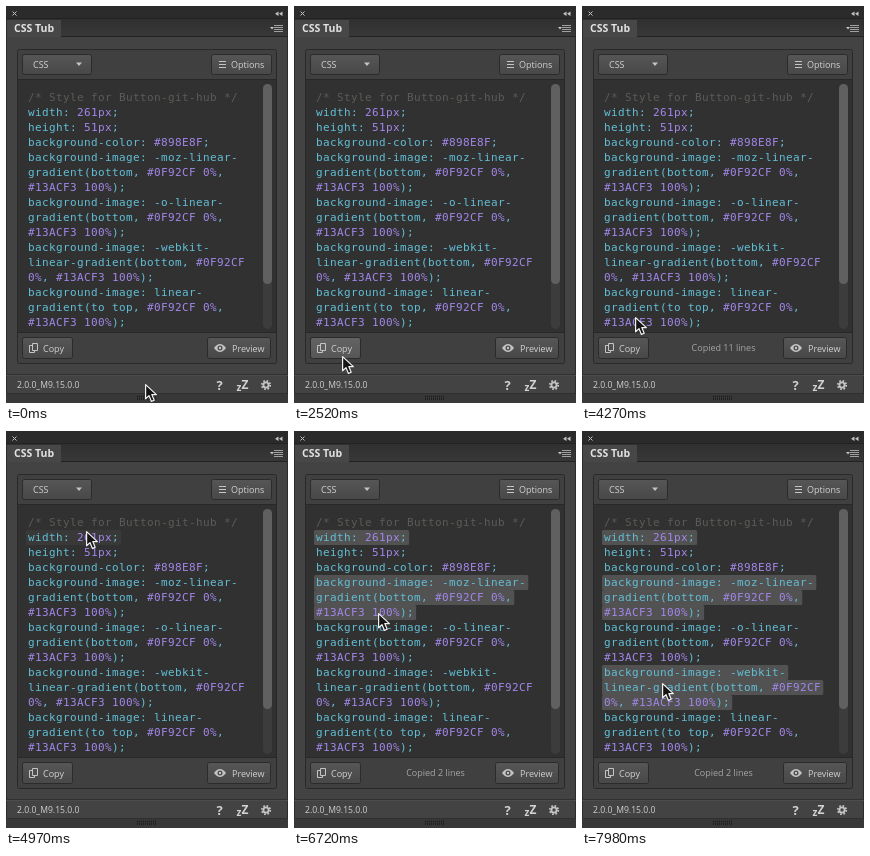
Recreate the animation shown at these times as an HTML page. Size 282 by 397 pixels, loop 8000 ms.

```html
<!DOCTYPE html>
<html lang="en">
<head>
<meta charset="utf-8">
<title>CSS panel</title>
<style>
  html, body { margin: 0; width: 100%; height: 100%; overflow: hidden; background: #434343; }
  svg { display: block; width: 282px; height: 397px; }
  text { white-space: pre; }
  .ui { font: 9px "Open Sans", sans-serif; fill: #d2d2d2; }
  .bold { font-weight: bold; }
  .code { font: 11px "DejaVu Sans Mono", monospace; letter-spacing: .38px; fill: #62bfd6; }
  .code .value { fill: #a287ea; }
  .code.comment { fill: #5b5b57; }
  .button { fill: url(#raised); stroke: #2b2b2b; }
  .icon { fill: none; stroke: #c4c4c4; }
  .solid { fill: #c4c4c4; }
</style>
</head>
<body>
<svg viewBox="0 0 282 397">
  <defs>
    <linearGradient id="raised" x2="0" y2="1">
      <stop stop-color="#565656"/><stop offset="1" stop-color="#484848"/>
    </linearGradient>
    <linearGradient id="tabs" x2="0" y2="1">
      <stop stop-color="#303030"/><stop offset="1" stop-color="#383838"/>
    </linearGradient>
  </defs>

  <!-- window -->
  <rect width="282" height="397" fill="#434343"/>
  <rect width="282" height="13" fill="#2b2b2b"/>
  <rect y="13" width="282" height="18" fill="url(#tabs)"/>
  <path d="M0 12.5H282M0 30.5H282" stroke="#222"/>
  <path d="M1 31V14H55V31Z" fill="#474747"/>
  <path class="icon" d="M6.500 5.500l4 4m0-4l-4 4"/>
  <path class="solid" d="M272.500 5.500v4.500l-3.500-2.250zM276.500 5.500v4.500l-3.500-2.250z"/>
  <path class="solid" d="M264 21h4l-2 2.500z"/>
  <path d="M268 19.500h9m-9 2h9m-9 2h9m-9 2h9" stroke="#a0a0a0"/>
  <text class="bold" x="8" y="26" style="font-family:'Open Sans',sans-serif;font-size:10.500px" fill="#e2e2e2">CSS Tub</text>
  <path d="M.5 13V397M281.500 13V397" stroke="#2c2c2c"/>

  <!-- code panel -->
  <rect x="11.500" y="43.500" width="259" height="314" rx="2" fill="#404040" stroke="#292929"/>
  <rect x="12" y="73" width="258" height="254" fill="#313131"/>
  <path d="M12 73.500H270M12 326.500H270" stroke="#282828"/>
  <rect x="257" y="78" width="9" height="245" rx="4.500" fill="#3c3c3c"/>
  <rect x="257" y="78" width="9" height="200" rx="4.500" fill="#606060"/>

  <g class="ui">
    <rect class="button" x="16.500" y="48.500" width="69" height="20" rx="2"/>
    <text x="27" y="61.500">CSS</text>
    <path class="solid" d="M70 56.500h6l-3 3.500z"/>
    <rect class="button" x="205.500" y="48.500" width="60" height="20" rx="2"/>
    <path class="icon" d="M213 55.500h7m-7 3h7m-7 3h7"/>
    <text x="225" y="61.500">Options</text>
    <rect class="button" x="16.500" y="331.500" width="50" height="21" rx="2"/>
    <rect id="copyTint" x="17" y="332" width="49" height="20" rx="2"/>
    <path class="icon" d="M26.500 337.500h5v7h-5zM26 339.500h-2.500v7h5v-2"/>
    <text x="37" y="345.500">Copy</text>
    <rect class="button" x="201.500" y="331.500" width="63" height="21" rx="2"/>
    <path class="solid" d="M208 342q6-8 12 0q-6 8-12 0z"/>
    <circle cx="214" cy="342" r="2.500" fill="#4c4c4c"/>
    <circle cx="214" cy="342" r="1.200" class="solid"/>
    <text x="226" y="345.500">Preview</text>
    <text id="message" x="141.500" y="345" text-anchor="middle" fill="#a5a5a5"></text>
  </g>

  <!-- status bar -->
  <path d="M0 368.500H282M0 387.500H282" stroke="#303030"/>
  <path d="M0 369.500H282" stroke="#4c4c4c"/>
  <rect y="388" width="282" height="9" fill="#383838"/>
  <path d="M131 390.500H151M131 393H151" stroke="#191919" stroke-width="1.500" stroke-dasharray="1 1"/>
  <g class="ui">
    <text x="11" y="382" style="font-size:8.600px">2.0.0_M9.15.0.0</text>
    <g class="bold">
      <text x="210.500" y="384" font-size="13">?</text>
      <text x="230.500" y="385" font-size="10">z</text>
      <text x="235.500" y="383" font-size="12">Z</text>
    </g>
    <circle class="icon" cx="260" cy="379" r="4.200" stroke-width="1.800" stroke-dasharray="1.650 1.650"/>
    <circle class="icon" cx="260" cy="379" r="2.600" stroke-width="1.900"/>
  </g>

  <g id="marks"></g>
  <g id="lines"></g>
  <path id="cursor" d="M.6 .6V14.800L4 11.600L6.400 17.400L9.200 16.200L6.800 10.600H11.400Z" fill="#151515" stroke="#f2f2f2" stroke-width="1.200" stroke-linejoin="round"/>
</svg>

<script>
const LOOP = 8000, STEP = 70, ROW = 15, ADVANCE = 7.01;
const $ = id => document.getElementById(id);

const rules = [
  ['width: 261px;'],
  ['height: 51px;'],
  ['background-color: #898E8F;'],
  ['background-image: -moz-linear-', 'gradient(bottom, #0F92CF 0%,', '#13ACF3 100%);'],
  ['background-image: -o-linear-', 'gradient(bottom, #0F92CF 0%,', '#13ACF3 100%);'],
  ['background-image: -webkit-', 'linear-gradient(bottom, #0F92CF', '0%, #13ACF3 100%);'],
  ['background-image: linear-', 'gradient(to top, #0F92CF 0%,', '#13ACF3 100%);'],
];

// [time, x, y]
const path = [
  [0, 139, 378], [1400, 139, 378], [1680, 119, 374], [2310, 48, 350],
  [4060, 48, 350], [4900, 80, 100], [5810, 80, 100], [6020, 83, 140],
  [6230, 83, 140], [6510, 84, 182], [7140, 84, 182], [7450, 80, 252],
];
// [rule, start, end]
const hovers = [
  [0, 4900, 5880], [2, 5950, 6300], [3, 6300, 7180],
  [4, 7180, 7380], [5, 7380, 8200],
];
// [rule, time]
const picks = [[0, 5390], [3, 6580], [5, 7910]];
// [time, text]
const messages = [
  [0, ''], [2870, 'Copied 11 lines'], [4690, ''],
  [5530, 'Copied 1 line'], [6720, 'Copied 2 lines'],
];

function add(parent, name, attrs) {
  const node = document.createElementNS('http://www.w3.org/2000/svg', name);
  for (const key in attrs) node.setAttribute(key, attrs[key]);
  return parent.appendChild(node);
}

function addLine(row, line, cls) {
  const text = add($('lines'), 'text', { x: 22, y: 95 + row * ROW, class: cls });
  for (const part of line.split(/(#\w{6}|\d+(?:px|%))/)) {
    const isValue = /^(#|\d)/.test(part);
    add(text, 'tspan', isValue ? { class: 'value' } : {}).textContent = part;
  }
}

addLine(0, '/* Style for Button-git-hub */', 'code comment');
let row = 1;
const marks = rules.map(lines => {
  const group = add($('marks'), 'g', {});
  for (const line of lines) {
    add(group, 'rect', {
      x: 20, y: 84 + row * ROW, width: 4 + line.length * ADVANCE, height: ROW, rx: 1.5,
    });
    addLine(row++, line, 'code');
  }
  return group;
});

const clamp = v => Math.max(0, Math.min(1, v));
const ease = v => v * v * (3 - 2 * v);
const latest = (table, t) => table.filter(entry => entry[0] <= t).pop();

function cursorAt(t) {
  const i = path.findIndex(p => p[0] > t);
  if (i < 0) return path[path.length - 1].slice(1);
  const [t0, x0, y0] = path[i - 1], [t1, x1, y1] = path[i];
  const k = ease((t - t0) / (t1 - t0));
  return [x0 + (x1 - x0) * k, y0 + (y1 - y0) * k].map(Math.round);
}

function render(t) {
  $('cursor').setAttribute('transform', `translate(${cursorAt(t)})`);
  $('message').textContent = latest(messages, t)[1];

  const pressed = t >= 2660 && t < 2800, over = t >= 2170 && t < 4200;
  $('copyTint').setAttribute('fill', pressed ? '#0005' : over ? '#ffffff14' : 'none');

  marks.forEach((mark, i) => {
    const picked = picks.some(([rule, at]) => rule === i && t >= at);
    const hover = hovers.find(([rule]) => rule === i);
    const glow = hover ? clamp((t - hover[1]) / 140) * clamp((hover[2] - t) / 140) : 0;
    mark.setAttribute('fill', picked ? '#525252' : '#424242');
    mark.setAttribute('opacity', picked ? 1 : glow);
  });
}

const start = performance.now();
function tick() {
  const t = (performance.now() - start) % LOOP;
  render(Math.floor(t / STEP) * STEP);
  requestAnimationFrame(tick);
}
tick();
</script>
</body>
</html>
```
